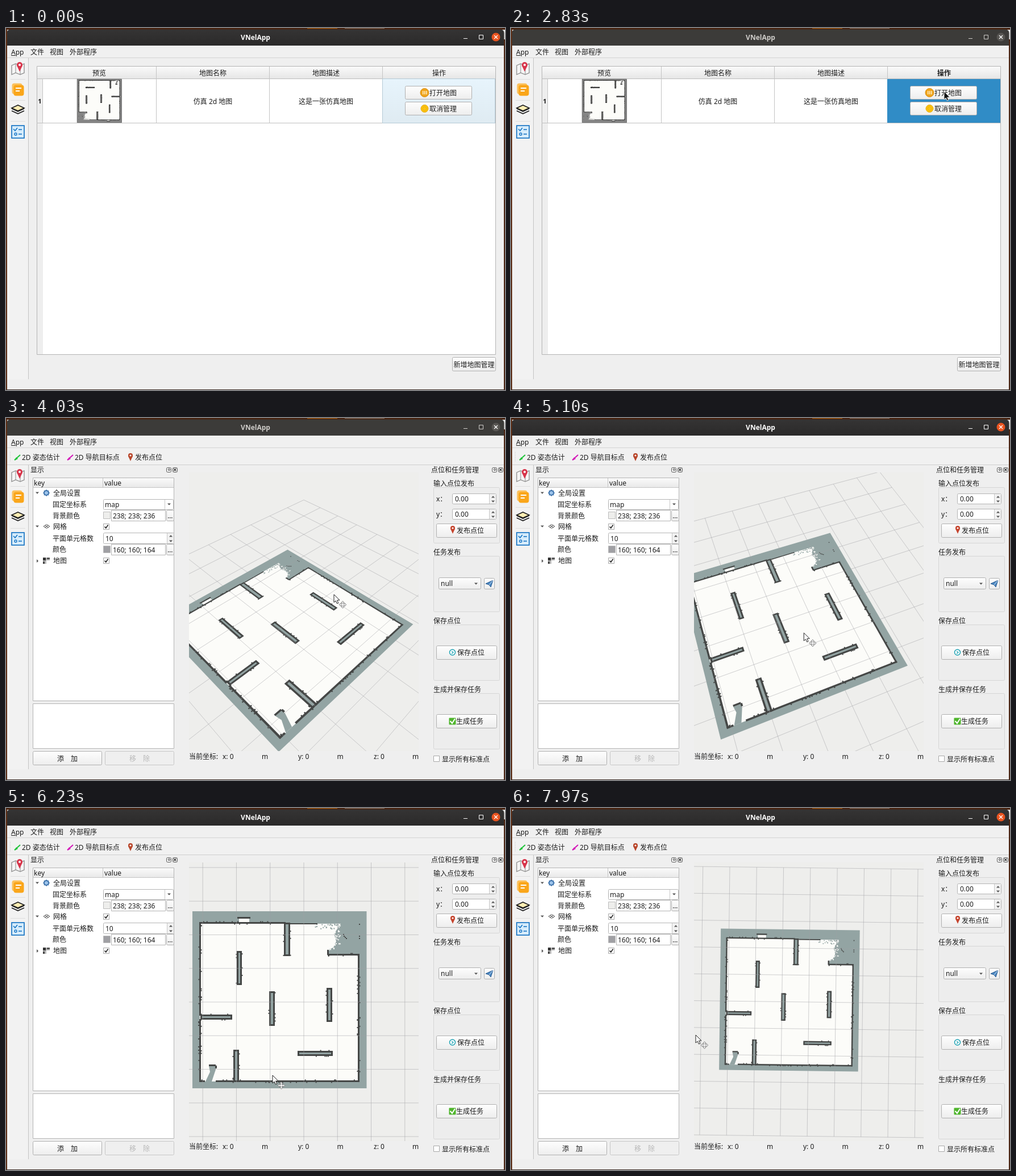
An HTML page with a canvas that plays this animation: 878 px wide and 638 px high, repeating every 8000 ms.

```html
<!DOCTYPE html>
<html lang="zh">
<head>
<meta charset="utf-8">
<style>
html, body { margin: 0; width: 100%; height: 100%; overflow: hidden; background: #efefef; }
canvas { display: block; }
</style>
</head>
<body>
<canvas id="stage" width="878" height="638"></canvas>
<script>
const ctx = document.getElementById('stage').getContext('2d');
const LOOP = 8000;
const SELECT = 2600, OPEN = 3080, FOCUS = 4400;
const FONT = "'Noto Sans', 'Noto Sans CJK SC', 'Noto Sans CJK', sans-serif";
const INK = '#1c1c1c', LINE = '#b4b4b4';

// ---- helpers ----
function track(keys, t) {
  if (t <= keys[0][0]) return keys[0].slice(1);
  for (let i = 1; i < keys.length; i++) {
    const a = keys[i - 1], b = keys[i];
    if (t < b[0]) {
      const k = (t - a[0]) / (b[0] - a[0]);
      return a.slice(1).map((v, j) => v + (b[j + 1] - v) * k);
    }
  }
  return keys[keys.length - 1].slice(1);
}

function fill(x, y, w, h, color) {
  ctx.fillStyle = color;
  ctx.fillRect(x, y, w, h);
}

function fade(y0, y1, from, to) {
  const g = ctx.createLinearGradient(0, y0, 0, y1);
  g.addColorStop(0, from);
  g.addColorStop(1, to);
  return g;
}

function box(x0, y0, x1, y1, paint, edge = LINE, r = 0) {
  ctx.beginPath();
  ctx.roundRect(x0 + 0.5, y0 + 0.5, x1 - x0 - 1, y1 - y0 - 1, r);
  if (paint) { ctx.fillStyle = paint; ctx.fill(); }
  if (edge) { ctx.strokeStyle = edge; ctx.lineWidth = 1; ctx.stroke(); }
}

function shape(pts, paint, edge, width = 1, closed = true) {
  ctx.beginPath();
  pts.forEach(p => ctx.lineTo(p[0], p[1]));
  if (closed) ctx.closePath();
  if (paint) { ctx.fillStyle = paint; ctx.fill(); }
  if (edge) { ctx.strokeStyle = edge; ctx.lineWidth = width; ctx.stroke(); }
}

function line(x0, y0, x1, y1, color, width = 1) {
  shape([[x0, y0], [x1, y1]], null, color, width, false);
}

function disc(x, y, r, paint, edge, width = 1) {
  ctx.beginPath();
  ctx.arc(x, y, r, 0, 7);
  if (paint) { ctx.fillStyle = paint; ctx.fill(); }
  if (edge) { ctx.strokeStyle = edge; ctx.lineWidth = width; ctx.stroke(); }
}

function text(s, x, y, { align = 'left', bold = false, color = INK, size = 12 } = {}) {
  ctx.font = `${bold ? 'bold ' : ''}${size}px ${FONT}`;
  ctx.textAlign = align;
  ctx.fillStyle = color;
  ctx.fillText(s, x, y);
}

function button(x0, y0, x1, y1) {
  box(x0, y0, x1, y1, fade(y0, y1, '#fefefe', '#ededed'), '#b0b0b0', 2);
}

// ---- floor map, in top-down units of 59.27 per metre around (524, 342) ----
const UNIT = 59.27, FOCAL = 592.7, CX = 524, CY = 342;
const ROOMS = [[341, 203], [589, 204], [583, 213], [577, 222], [581, 235], [576, 246],
  [566, 250], [566, 258], [620, 259], [620, 482], [341, 482]];
const SLUG = [[357, 455], [369, 455], [369, 461], [362, 482], [351, 482], [359, 465]];
const WALLS = [[340, 201, 492, 204], [340, 203, 343, 366], [340, 372, 343, 482],
  [340, 480, 350, 483], [369, 480, 403, 483], [407, 480, 622, 483], [619, 259, 622, 483],
  [566, 257, 622, 260], [565, 250, 568, 259], [500, 203, 548, 205], [407, 192, 430, 195],
  [357, 452, 369, 455], [368, 454, 371, 459]];
const BOXES = [[489, 202, 500, 261], [406, 252, 415, 312], [463, 323, 473, 384],
  [564, 317, 574, 377], [513, 428, 575, 437], [342, 364, 398, 373], [400, 426, 410, 483]];

let seed = 11;
const rnd = () => (seed = (seed * 16807) % 2147483647) / 2147483647;
const quad = (x0, y0, x1, y1) => [[x0, y0], [x1, y0], [x1, y1], [x0, y1]];
const dot = (x, y) => quad(x, y, x + 2, y + 2);

const grit = [];
[...WALLS.slice(0, 8), ...BOXES].forEach(([x0, y0, x1, y1]) => {
  const n = Math.max(x1 - x0, y1 - y0) / 11;
  for (let i = 0; i < n; i++) {
    const side = rnd() < 0.5;
    grit.push(x1 - x0 > y1 - y0
      ? dot(x0 + rnd() * (x1 - x0 - 2), side ? y0 - 1.5 : y1 - 0.5)
      : dot(side ? x0 - 1.5 : x1 - 0.5, y0 + rnd() * (y1 - y0 - 2)));
  }
});
[[593, 222], [594, 225], [596, 227], [598, 229], [621, 204], [621, 225], [621, 229],
  [338, 376], [338, 382], [338, 406], [338, 420], [338, 426]].forEach(p => grit.push(dot(...p)));
const pale = [], dust = [];
for (let i = 0; i < 42; i++) {
  const y = 206 + rnd() * 44;
  pale.push(dot(572 + rnd() * 15 - (y > 240 ? 6 : 0), y));
  if (i < 26) dust.push(dot(543 + rnd() * 42, 204 + rnd() * rnd() * 13));
}

function drawMap(place, grey, dark) {
  const put = (pts, color) => shape(pts.map(p => place(...p)), color);
  const white = '#fcfcf9';
  put(quad(328, 182, 634.5, 494), grey);
  put(ROOMS, white);
  put(quad(410, 195, 428, 203), white);
  pale.forEach(d => put(d, white));
  dust.forEach(d => put(d, grey));
  put(SLUG, grey);
  WALLS.forEach(w => put(quad(...w), dark));
  BOXES.forEach(([x0, y0, x1, y1]) => {
    put(quad(x0, y0, x1, y1), dark);
    put(quad(x0 + 3, y0 + 3, x1 - 3, y1 - 3), grey);
  });
  grit.forEach(d => put(d, dark));
}

const YAW = [[4400, 45], [5570, 6], [6150, 0], [6700, 0], [7100, -0.7]];
const PITCH = [[4400, 45], [5570, 68.4], [6150, 90]];
const DIST = [[6750, 10], [7450, 12.53]];

function camera(t) {
  const yaw = track(YAW, t)[0] * Math.PI / 180;
  const pitch = track(PITCH, t)[0] * Math.PI / 180;
  const dist = track(DIST, t)[0];
  const c = Math.cos(yaw), s = Math.sin(yaw), pc = Math.cos(pitch), ps = Math.sin(pitch);
  return (x, y) => {
    const u = (x - CX) / UNIT, v = (CY - y) / UNIT;
    const across = u * c - v * s, ahead = u * s + v * c;
    const k = FOCAL / (dist + ahead * pc);
    return [CX + across * k, CY - ahead * ps * k];
  };
}

function drawScene(t) {
  const place = camera(t);
  ctx.save();
  ctx.beginPath();
  ctx.rect(322, 96, 404, 491);
  ctx.clip();
  fill(322, 96, 404, 491, '#eeeeec');
  drawMap(place, '#93a4a3', '#454746');
  const far = 5 * UNIT;
  for (let i = -5; i <= 5; i++) {
    const d = i * UNIT;
    for (const [a, b] of [[place(CX + d, CY - far), place(CX + d, CY + far)],
      [place(CX - far, CY + d), place(CX + far, CY + d)]]) {
      line(...a, ...b, 'rgba(160,160,164,.5)');
    }
  }
  ctx.restore();
}

// ---- small icons ----
function pin(x, y, r, color) {
  shape([[x - r, y - 1], [x + r, y - 1], [x, y + r * 2]], color);
  disc(x, y - 2, r, color);
  disc(x, y - 2, r * 0.4, '#fff');
}

function sideIcons(y) {
  shape([[10, y - 6], [17, y - 9], [25, y - 6], [32, y - 9], [32, y + 7], [25, y + 10], [17, y + 7], [10, y + 10]], '#f6f6f6', '#8b8b8b', 1.3);
  line(17, y - 8, 17, y + 7, '#8b8b8b');
  line(25, y - 6, 25, y + 10, '#8b8b8b');
  pin(24, y - 5, 5, '#d8354b');

  box(10, y + 25, 29, y + 45, '#fbc15e', null, 4);
  box(13, y + 28, 32, y + 48, '#faa61a', null, 4);
  fill(17, y + 33, 10, 2, '#fff');
  fill(17, y + 38, 7, 2, '#fff');

  const cy = y + 69;
  for (const d of [9, 5]) shape([[10, cy + d - 4], [21, cy + d + 1], [32, cy + d - 4]], null, '#222', 1.7, false);
  shape([[10, cy], [21, cy - 5], [32, cy], [21, cy + 5]], '#fbeeb4', '#222', 1.6);

  const by = y + 100;
  box(10, by, 32, by + 22, '#d6ecfb', null, 2);
  ctx.strokeStyle = '#1976c5';
  ctx.lineWidth = 1.7;
  ctx.strokeRect(10, by, 22, 22);
  shape([[13, by + 6], [16, by + 9], [20, by + 4]], null, '#1976c5', 1.6, false);
  line(22, by + 7, 28, by + 7, '#1976c5', 1.6);
  disc(17, by + 15, 2, null, '#1976c5', 1.4);
  line(22, by + 15, 28, by + 15, '#1976c5', 1.6);
  for (const d of [18, 55, 92]) line(8, y + d + 0.5, 34, y + d + 0.5, '#dedede');
}

function dockButtons(x) {
  for (const cx of [x, x + 11]) box(cx - 4, 87, cx + 5, 96, '#f4f4f4', '#555', 2);
  disc(x + 1, 91, 1.6, null, '#444');
  line(x + 9, 89, x + 13.5, 93.5, '#333', 1.2);
  line(x + 13.5, 89, x + 9, 93.5, '#333', 1.2);
}

function chevron(x, y, dir = 1) {
  shape([[x - 3, y - 1.5 * dir], [x + 3, y - 1.5 * dir], [x, y + 1.8 * dir]], '#555');
}

function tick(x, y, on) {
  box(x, y, x + 11, y + 11, '#fff', '#a8a8a8');
  if (on) shape([[x + 2.5, y + 5.5], [x + 4.8, y + 8], [x + 8.5, y + 2.5]], null, '#222', 1.6, false);
}

function spin(x0, y0, x1, y1, value, pad = 5) {
  box(x0, y0, x1, y1, '#fff', LINE, 2);
  fill(x1 - 12, y0 + 1, 11, y1 - y0 - 2, '#f1f1f1');
  line(x1 - 12.5, y0 + 1, x1 - 12.5, y1 - 1, '#c8c8c8');
  chevron(x1 - 6, y0 + 6, -1);
  chevron(x1 - 6, y1 - 5);
  text(value, x0 + pad, y1 - 5);
}

// ---- window parts ----
function drawFrame(active) {
  fill(0, 0, 878, 638, '#efefef');
  fill(0, 0, 878, 3, '#47220f');
  fill(530, 0, 53, 1, '#b86a12');
  fill(596, 0, 70, 1, '#8c7a6c');
  box(1, 2, 877, 40, active ? fade(2, 31, '#353434', '#2b2a2a') : '#3c3b39', null, 6);
  fill(2, 31, 874, 22, '#f0f0f0');
  fill(0, 2, 2, 636, '#5b2d15');
  fill(876, 20, 2, 618, '#4a2412');
  fill(0, 637, 878, 1, '#3a2a22');

  const tone = active ? '#fff' : '#cfcdca';
  text('VNelApp', 439, 21, { align: 'center', bold: true, color: tone });
  fill(805, 18, 7, 1, tone);
  box(832, 12, 840, 20, null, tone);
  disc(862, 16, 7.5, active ? '#e95420' : '#575552');
  line(859, 13, 865, 19, '#fff', 1.3);
  line(865, 13, 859, 19, '#fff', 1.3);

  text('App', 9, 47);
  fill(9, 48, 8, 1, INK);
  text('文件', 43, 47);
  text('视图', 77, 47);
  text('外部程序', 112, 47);
  fill(2, 52, 874, 1, '#d4d4d4');
}

function drawSide(top, first) {
  fill(2, top, 37, 619 - top, '#f2f2f2');
  fill(39, top, 1, 619 - top, '#c3c3c3');
  sideIcons(first);
}

function drawList(t) {
  const chosen = t >= SELECT;
  drawSide(53, 72);
  box(54, 67, 862, 576, '#fff');
  fill(55, 68, 806, 21, fade(68, 89, '#fafafa', '#e6e6e6'));
  fill(55, 89, 10, 486, '#eee');
  fill(54, 89, 807, 1, '#bdbdbd');
  fill(54, 167, 807, 1, '#c0c0c0');
  for (const x of [264, 463, 662]) fill(x, 68, 1, 100, '#c4c4c4');
  fill(64, 89, 1, 79, '#c4c4c4');

  const mid = { align: 'center' };
  text('预览', 164, 84, mid);
  text('地图名称', 364, 84, mid);
  text('地图描述', 563, 84, mid);
  text('操作', 762, 84, { align: 'center', bold: chosen });
  text('1', 59.5, 133, { align: 'center', size: 11, bold: chosen || t < 870 });
  text('仿真 2d 地图', 364, 134, mid);
  text('这是一张仿真地图', 563, 134, mid);

  drawMap((x, y) => [203.5 - (x - 328) * 0.257, 167 - (y - 182) * 0.248], '#858585', '#111');
  box(125, 90, 204, 167, null, '#777');

  if (chosen) fill(662, 90, 199, 77, '#308cc6');
  else box(662, 89, 861, 168, fade(90, 167, '#e7f4fc', '#dfebf2'), '#b5cad6');
  button(702, 102, 820, 126);
  button(702, 130, 820, 154);
  disc(736.5, 114, 7.5, '#f0a51e', '#d68a0c');
  for (const x of [733, 736, 739]) fill(x, 111, 1.5, 6, '#fff0c8');
  disc(736.5, 142, 6.5, '#fbc50f', '#e5a50a');
  disc(736.5, 142, 3.5, null, '#f3ac10');
  text('打开地图', 745, 119);
  text('取消管理', 745, 147);
  button(785, 580, 862, 605);
  text('新增地图管理', 823.5, 598, mid);
}

function drawToolbar() {
  fill(2, 53, 874, 29, '#f1f1f1');
  fill(2, 82, 874, 1, '#cfcfcf');
  for (let y = 60; y < 78; y += 3) fill(7, y, 1, 1, '#c4c4c4');
  [[15, '#1fc43a'], [108, '#d414b8']].forEach(([x, color]) => {
    line(x, 74, x + 10, 65, color, 2);
    shape([[x + 3, 69], [x + 6, 72], [x, 75]], color);
  });
  text('2D 姿态估计', 28, 74);
  text('2D 导航目标点', 121, 74);
  pin(219, 68, 4, '#b8452a');
  text('发布点位', 227, 74);
}

function colorField(y, swatch, value) {
  box(171, y - 7, 184, y + 6, swatch, '#bbb');
  box(185, y - 10, 281, y + 10, '#fff');
  text(value, 188, y + 5);
  button(282, y - 10, 296, y + 10);
  for (const x of [285, 288, 291]) fill(x, y + 3, 1.5, 1.5, '#333');
}

function drawTree() {
  text('显示', 43, 96);
  dockButtons(286);
  box(47, 105, 296, 499, '#fff');
  fill(48, 106, 247, 16, fade(106, 122, '#fafafa', '#e9e9e9'));
  fill(48, 122, 247, 1, '#c4c4c4');
  fill(170, 106, 1, 16, '#c4c4c4');
  text('key', 49, 119);
  text('value', 173, 119);

  chevron(55, 132);
  chevron(55, 191);
  shape([[54, 249], [57, 252], [54, 255]], '#555');
  disc(71, 132, 4, '#9cc3ea', '#3f74ad', 2);
  for (let i = 0; i < 8; i++) {
    const a = i * Math.PI / 4;
    fill(70.3 + 5 * Math.cos(a), 131.3 + 5 * Math.sin(a), 1.5, 1.5, '#3f74ad');
  }
  shape([[66, 191], [71.5, 187.5], [77, 191], [71.5, 194.5]], null, '#555');
  line(68.5, 189, 74.5, 193, '#555');
  line(74.5, 189, 68.5, 193, '#555');
  fill(65, 246, 12, 11, '#b8b8b8');
  fill(65, 246, 5, 5, '#333');
  fill(72, 246, 5, 3, '#555');
  fill(65, 253, 3, 4, '#444');
  fill(71, 251, 6, 6, '#fff');

  text('全局设置', 83, 137);
  text('固定坐标系', 82, 157);
  text('背景颜色', 82, 177);
  text('网格', 83, 196);
  text('平面单元格数', 82, 217);
  text('颜色', 82, 236);
  text('地图', 83, 256);

  box(171, 143, 295, 162, '#fff', LINE, 2);
  fill(279, 144, 1, 17, '#c8c8c8');
  chevron(287, 152);
  text('map', 174, 157);
  colorField(172, '#eeeeec', '238; 238; 236');
  colorField(232, '#a0a0a4', '160; 160; 164');
  tick(171, 186, true);
  tick(171, 246, true);
  spin(171, 202, 296, 222, '10', 4);

  box(47, 503, 296, 583, '#fff');
  button(47, 587, 169, 612);
  box(174, 587, 296, 612, '#efefef', '#c6c6c6', 2);
  text('添　加', 108, 605, { align: 'center' });
  text('移　除', 235, 605, { align: 'center', color: '#b8b8b8' });
}

function group(title, top, bottom) {
  text(title, 752, top - 2);
  box(752, top, 869, bottom, '#ededed', '#d6d6d6', 2);
}

function drawTasks() {
  text('点位和任务管理', 748, 96);
  dockButtons(859);
  group('输入点位发布', 122, 221);
  text('x：', 757, 147);
  text('y：', 757, 174);
  spin(785, 133, 863, 152, '0.00');
  spin(785, 160, 863, 179, '0.00');
  button(757, 186, 864, 211);
  pin(786, 196, 4, '#c5432c');
  text('发布点位', 793, 203);

  group('任务发布', 243, 342);
  button(761, 281, 836, 302);
  text('null', 765, 296);
  chevron(827, 292);
  button(841, 282, 860, 302);
  shape([[844, 292], [857, 286], [853, 298], [850, 294]], '#4a86c0', '#2d5f94');
  line(850, 294, 857, 286, '#d7e8f7');

  group('保存点位', 364, 463);
  button(757, 401, 864, 426);
  disc(785.5, 413, 5, '#fff', '#1fa3b4', 1.5);
  shape([[784, 411], [787, 413], [784, 415.5]], null, '#1fa3b4', 1.2, false);
  text('保存点位', 794, 418);

  group('生成并保存任务', 485, 584);
  button(757, 522, 864, 547);
  box(779, 528, 792, 541, '#4fb52c', null, 1);
  shape([[781.5, 534], [785, 538], [790, 530]], null, '#fff', 2, false);
  text('生成任务', 792, 539);
  tick(752, 595, false);
  text('显示所有标准点', 767, 606);
}

function drawMapPage(t) {
  drawToolbar();
  drawSide(83, 102);
  drawTree();
  drawScene(t);
  text('当前坐标:', 322, 601);
  ['x', 'y', 'z'].forEach((axis, i) => {
    text(axis + ': 0', 381 + i * 133, 601);
    text('m', 450 + i * 132.5, 601);
  });
  drawTasks();
}

// ---- pointer ----
const POINTER = [[1000, 742, 166], [1530, 761, 100], [1950, 762, 112], [3200, 762, 112],
  [3950, 577, 311], [4400, 577, 311], [5570, 474, 424], [6150, 469, 471], [6900, 469, 471],
  [7700, 325, 400]];

function drawPointer(t) {
  if (t < 1000) return;
  const [x, y] = track(POINTER, t);
  const overMap = t >= OPEN && x > 322 && x < 726;
  const tip = [[0, 0], [0, 14], [3.2, 11.2], [5.4, 16], [7.8, 15], [5.6, 10.2], [10, 10]];
  shape(tip.map(([a, b]) => [x + a, y + b]), overMap ? '#fff' : '#111', overMap ? '#222' : '#ddd');
  if (!overMap) return;
  const cx = x + 15.5, cy = y + 18;
  const star = [];
  for (let i = 0; i < 4; i++) {
    const c = Math.cos(i * Math.PI / 2), s = Math.sin(i * Math.PI / 2);
    for (const [a, b] of [[1.3, -1.3], [3.5, -1.3], [3.5, -2.6], [6.3, 0], [3.5, 2.6], [3.5, 1.3]]) {
      star.push([cx + a * c - b * s, cy + a * s + b * c]);
    }
  }
  shape(star, '#f4f4f4', '#777', 0.9);
}

function render(t) {
  drawFrame(t < SELECT || t >= FOCUS);
  if (t < OPEN) drawList(t);
  else drawMapPage(t);
  drawPointer(t);
}

const start = performance.now();
function loop() {
  render((performance.now() - start) % LOOP);
  requestAnimationFrame(loop);
}
loop();
</script>
</body>
</html>
```
